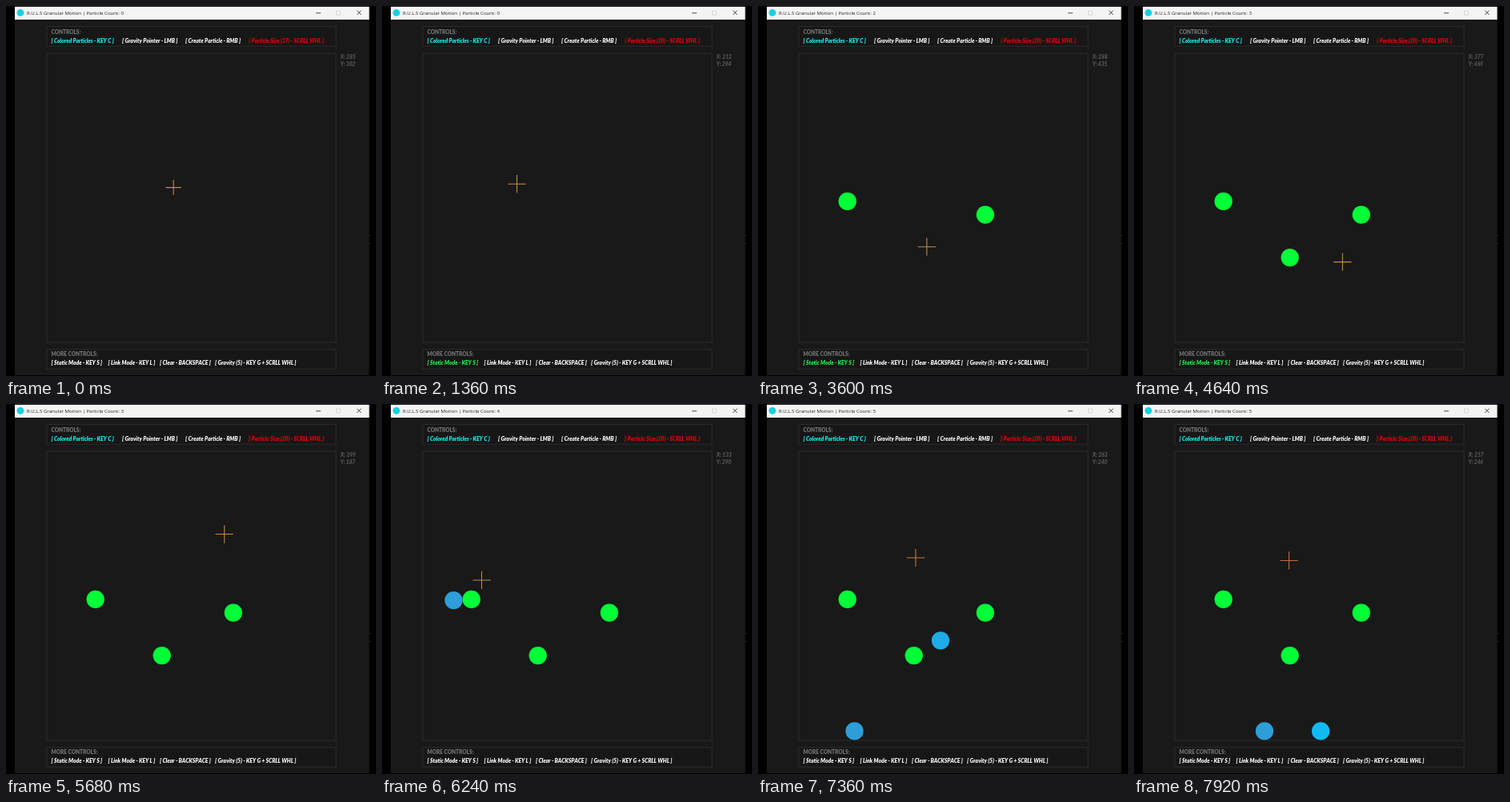
Recreate the animation shown at these times as an HTML page. Size 462 by 462 pixels, loop 8 s.

```html
<!DOCTYPE html>
<html lang="en">
<head>
<meta charset="utf-8">
<title>Particles</title>
<style>
  html, body { margin: 0; width: 100%; height: 100%; overflow: hidden; background: #000; }
  svg { display: block; width: 100vw; height: 100vh; }
  text { white-space: pre; font-kerning: none; }
  .bar { font: 6.1px "Open Sans", "Noto Sans", sans-serif; fill: #222; }
  .head { font: 900 6.5px Lato, sans-serif; fill: #757575; }
  .item { font: italic 900 6.7px Lato, sans-serif; fill: #fff; }
  .pos { font: italic 900 6.7px Lato, sans-serif; fill: #555; }
  .box { fill: #171717; stroke: #2a2a2a; stroke-width: 1.1; }
  .arena { fill: #191919; }
  .on { fill: #1df2f2; }
  .green { fill: #2af04a; }
  .red { fill: #dc0808; }
</style>
</head>
<body>
<svg viewBox="0 0 462 462">
  <rect width="462" height="462" fill="#000"/>
  <rect x="11" width="442.5" height="461" fill="#191919"/>
  <path d="M453 286.5h2.5M453 296.5h2.5" stroke="#2a2a2a"/>
  <rect x="11" y="1" width="442.5" height="16" fill="#f4f4f4"/>
  <circle cx="18" cy="8.3" r="4.4" fill="#12cfe6"/>
  <text class="bar" id="title" x="26" y="10.8"></text>
  <g fill="none" stroke="#222" stroke-width=".8">
    <path d="M387 8.8h6M438.2 5.6l5.4 5.4m0-5.4l-5.4 5.4"/>
    <rect x="412.500" y="6" width="5" height="5" stroke="#d0d0d0"/>
  </g>

  <rect class="box" x="51" y="25.5" width="361" height="24.7"/>
  <rect class="box arena" x="51" y="59" width="361" height="361"/>
  <rect class="box" x="51" y="428.8" width="361" height="24.5"/>

  <text class="head" x="56.5" y="34.5">CONTROLS:</text>
  <g class="item">
    <text class="on" x="56.5" y="45.6">[ Colored Particles - KEY C ]</text>
    <text x="145" y="45.6">[ Gravity Pointer - LMB ]</text>
    <text x="224" y="45.6">[ Create Particle - RMB ]</text>
    <text class="red" id="size" x="303" y="45.6"></text>
  </g>

  <text class="head" x="56.5" y="437.2">MORE CONTROLS:</text>
  <g class="item">
    <text id="mode" x="56.5" y="448.2">[ Static Mode - KEY S ]</text>
    <text x="127.5" y="448.2">[ Link Mode - KEY L ]</text>
    <text x="192" y="448.2">[ Clear - BACKSPACE ]</text>
    <text x="261" y="448.2">[ Gravity (5) - KEY G + SCRLL WHL ]</text>
  </g>

  <text class="pos" id="px" x="417.5" y="65.8"></text>
  <text class="pos" id="py" x="417.5" y="74.6"></text>

  <!-- arena units: 650 x 650 -->
  <g transform="translate(50.4 58.4) scale(.557)">
    <g id="balls"></g>
    <path id="cross" fill="none" stroke-width="1.9"/>
  </g>
</svg>
<script>
const LOOP = 8000, STEP = 80, GRAVITY = 900, FLOOR = 628.5, R = 20;
const $ = id => document.getElementById(id);
const mix = (a, b, u) => a + (b - a) * u;
const clamp = u => Math.min(1, Math.max(0, u));

// where the pointer passes; a click creates a particle there
const path = [
  { t: 1120, x: 285, y: 302 },
  { t: 1360, x: 212, y: 294 },
  { t: 1920, x: 110, y: 333, click: true },
  { t: 2640, x: 457, y: 358 },
  { t: 3040, x: 419, y: 363, click: true },
  { t: 3840, x: 259, y: 459, click: true },
  { t: 4640, x: 377, y: 469 },
  { t: 5680, x: 399, y: 187 },
  { t: 5920, x: 80, y: 298, click: true, move: roll },
  { t: 6720, x: 308, y: 241, click: true, move: drop },
  { t: 6800, x: 280, y: 233 },
  { t: 7920, x: 257, y: 246 }
];
const balls = path.filter(p => p.click);
for (const b of balls) {
  b.el = document.createElementNS('http://www.w3.org/2000/svg', 'circle');
  b.el.setAttribute('r', R);
  $('balls').append(b.el);
}

function slope(i, k) {
  const a = path[i - 1], c = path[i + 1];
  return a && c ? (c[k] - a[k]) / (c.t - a.t) : 0;
}

// smooth curve through the path points
function pointer(t, k) {
  let i = 0;
  while (i < path.length - 2 && t >= path[i + 1].t) i++;
  const a = path[i], b = path[i + 1], d = b.t - a.t;
  const u = clamp((t - a.t) / d), v = 1 - u;
  return a[k] * v * v * (1 + 2 * u) + b[k] * u * u * (3 - 2 * u)
    + d * u * v * (slope(i, k) * v - slope(i + 1, k) * u);
}

// height after s seconds of falling, with damped bounces
function fall(y, v, s) {
  for (let n = 0; n < 3; n++) {
    const hit = (-v + Math.sqrt(v * v + 2 * GRAVITY * (FLOOR - y))) / GRAVITY;
    if (s < hit) return y + v * s + GRAVITY * s * s / 2;
    s -= hit;
    v = -0.1 * (v + GRAVITY * hit);
    y = FLOOR;
  }
  return FLOOR;
}

// drops onto the first particle, rolls off its left side, falls and runs right
function roll(b, t) {
  const hit = 6057, leave = 6280;
  if (t < hit) return [b.x, fall(b.y, 0, (t - b.t) / 1000)];
  const u = clamp((t - hit) / (leave - hit));
  const angle = mix(221.5, 164, u ** 1.3) * Math.PI / 180;
  const x = balls[0].x + 2 * R * Math.cos(angle);
  const y = balls[0].y + 2 * R * Math.sin(angle);
  if (u < 1) return [x, y];
  return [x + 130.5 * clamp((t - 6840) / 1080) ** 1.2, fall(y, 215, (t - leave) / 1000)];
}

function drop(b, t) {
  return [b.x + 20 * (t - b.t) / 1200, fall(b.y, 0, (t - b.t) / 1000)];
}

function tint(b, t) {
  if (!b.move) return '#00ff37';
  const u = b.move === drop ? (t - b.t) / 1200 : 0;
  return `hsl(${mix(200, 195, u)} ${mix(68, 91, u)}% 51%)`;
}

function draw(t) {
  const live = balls.filter(b => t >= b.t).length;
  const size = 17 + Math.round(3 * clamp((t - 160) / 480));
  const x = Math.round(pointer(t, 'x')), y = Math.round(pointer(t, 'y'));

  $('title').textContent = `R.U.L.S Granular Motion | Particle Count: ${live}`;
  $('size').textContent = `[ Particle Size (${size}) - SCRLL WHL ]`;
  $('mode').classList.toggle('green', t >= 1040 && t < 5280);
  $('px').textContent = `X: ${x}`;
  $('py').textContent = `Y: ${y}`;

  balls.forEach((b, i) => {
    b.el.style.display = i < live ? '' : 'none';
    if (i >= live) return;
    const [cx, cy] = b.move ? b.move(b, t) : [b.x, b.y];
    b.el.setAttribute('cx', cx);
    b.el.setAttribute('cy', cy);
    b.el.setAttribute('fill', tint(b, t));
  });

  $('cross').setAttribute('d', `M${x - size} ${y}h${2 * size}M${x} ${y - size}v${2 * size}`);
  $('cross').setAttribute('stroke', `hsl(${36 - 18 * (t / LOOP) ** 8} 50% 51%)`);
}

const start = performance.now();
function tick() {
  const t = (performance.now() - start) % LOOP;
  draw(Math.floor(t / STEP) * STEP);
  requestAnimationFrame(tick);
}
tick();
</script>
</body>
</html>
```
